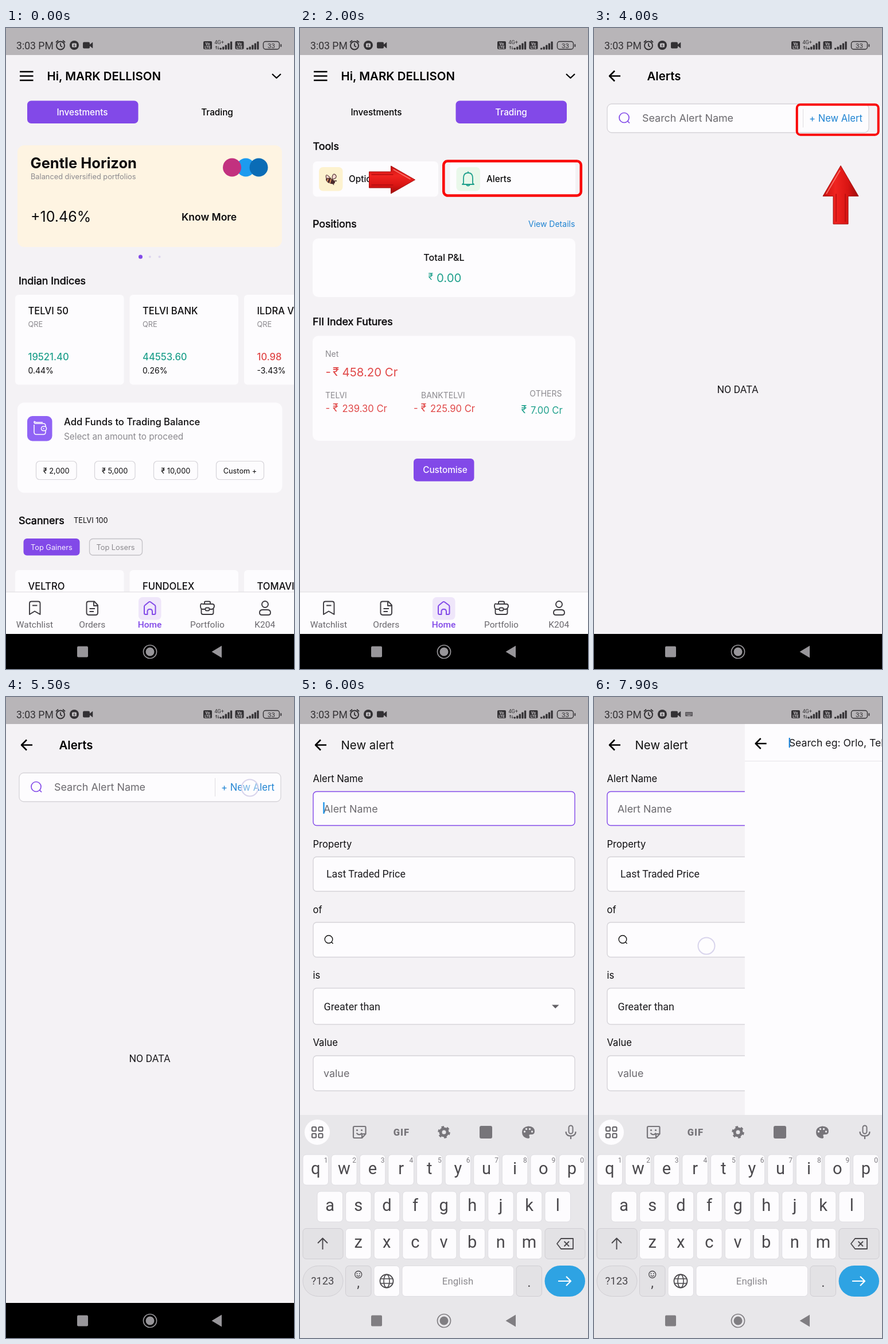
Recreate the animation shown at these times as an HTML page. Size 502 by 1115 pixels, loop 8 s.

```html
<!DOCTYPE html>
<html lang="en">
<head>
<meta charset="utf-8">
<title>Creating a price alert</title>
<style>
html, body { margin: 0; width: 100%; height: 100%; overflow: hidden; background: #f4f2f5; }
#stage { display: block; width: 100vw; height: 100vh; font-family: Inter, sans-serif; font-optical-sizing: none; }
#stage text { white-space: pre; }
.rob { font-family: Roboto, sans-serif; }
</style>
</head>
<body>
<svg id="stage" viewBox="0 0 502 1115">
  <defs>
    <linearGradient id="red" x1="0" y1="0" x2="0" y2="1">
      <stop offset="0" stop-color="#c4100f"/><stop offset=".35" stop-color="#f02420"/>
      <stop offset=".7" stop-color="#d91513"/><stop offset="1" stop-color="#9c0c0c"/>
    </linearGradient>
  </defs>
</svg>
<script>
const W = 502, LOOP = 8000;
const PURPLE = '#8249e8', INK = '#0c0b0d', GREY = '#8b898e', GREEN = '#1fa08c', LOSS = '#e04747';
const BG = '#f4f2f5', CARD = '#fdfcfe', BLUE = '#1e83d2', HINT = '#6b696e', LINE = '#d6d4d9';

// Drawing helpers
const T = (x, y, s, size, fill = INK, more = '') =>
  `<text x="${x}" y="${y}" font-size="${size}" fill="${fill}" ${more}>${s}</text>`;
const R = (x, y, w, h, r, fill, stroke = 'none', sw = 1, more = '') =>
  `<rect x="${x}" y="${y}" width="${w}" height="${h}" rx="${r}" fill="${fill}" stroke="${stroke}" stroke-width="${sw}" ${more}/>`;
const C = (x, y, r, fill, stroke = 'none', sw = 1, more = '') =>
  `<circle cx="${x}" cy="${y}" r="${r}" fill="${fill}" stroke="${stroke}" stroke-width="${sw}" ${more}/>`;
const P = (d, stroke, sw = 2, fill = 'none', more = '') =>
  `<path d="${d}" stroke="${stroke}" stroke-width="${sw}" fill="${fill}" stroke-linejoin="round" ${more}/>`;
const G = (x, y, s) => `<g transform="translate(${x} ${y})">${s}</g>`;
const page = (id, body, h = 1054, bg = BG) =>
  `<svg id="${id}" width="${W}" height="${h}">${bg ? R(0, 0, W, h, 0, bg) : ''}${body}</svg>`;
const MID = 'text-anchor="middle"', MED = 'font-weight="500"', SEMI = 'font-weight="600"', ROB = 'class="rob"';
const head = (x, y, s) => T(x, y, s, 17.9, INK, `stroke="${INK}" stroke-width=".55"`);
const back = (x, y) => G(x, y, P('M20 0H1M10 -9L1 0L10 9', '#000', 2.5));
const lens = (x, y, r, color, sw) => C(x, y, r, 'none', color, sw) +
  P(`M${x + r * .7} ${y + r * .7}l${r * .42} ${r * .42}`, color, sw);

function statusBar() {
  const ink = '#333134';
  const volte = x => R(x, 23, 15, 14, 2, ink) +
    T(x + 7.5, 29.5, 'Vo', 6.5, '#c8c5c8', `${MID} ${ROB} font-weight="700"`) +
    T(x + 7.5, 36, 'LTE', 6.5, '#c8c5c8', `${MID} ${ROB} font-weight="700"`);
  const bars = x => [3, 5, 8, 11, 14].map((h, i) => R(x + i * 4.6, 37.5 - h, 3.3, h, .8, ink)).join('');
  return R(0, 0, W, 47, 0, '#b8b5b8') +
    T(18, 36.5, '3:03 PM', 17.6, ink, ROB) +
    C(95, 30.5, 7, 'none', ink, 2) + P('M95 26.5V31L98 33M87 25L91 21.5M103 25L99 21.5', ink, 1.8) +
    C(119, 30, 8, ink) + R(115, 26.5, 8, 7, 1.5, '#c0bdc0') + P('M119 28v4M117.5 30.5L119 32L120.5 30.5', ink, 1) +
    R(134, 24.5, 12, 11, 2, ink) + P('M146 29L151 25V35L146 31Z', ink, .5, ink) +
    volte(344) + T(363.5, 28, '4G+', 9, ink, ROB) +
    P('M366.5 37V32M365 33.5L366.5 31.5L368 33.5M370 32V37M368.7 35.5L370 37L371.3 35.5', ink, .9) +
    bars(372.5) + volte(399.5) + bars(419) +
    R(448.5, 23.5, 28, 13.5, 4, 'none', ink, 1.4) + R(478.5, 28, 1.8, 5, .9, ink) +
    T(462.5, 34.5, '33', 11.5, ink, `${MID} ${ROB}`) +
    `<g id="kbIcon">${R(159, 26, 13, 7.5, 1, '#5b585c')}${P('M160.5 28.3H171M160.5 30.3H171', '#b8b5b8', .9, 'none', 'stroke-dasharray="1.2 .8"')}${P('M163 32.2H168', '#b8b5b8', .9)}</g>`;
}

function tile(x, y, name, value, pct, color, id = '') {
  return R(x, y, 189.5, 156.5, 6, CARD) + T(x + 22.5, y + 34, name, 16.6, INK, MED) +
    T(x + 22.5, y + 56, 'QRE', 12.8, GREY) +
    T(x + 22.5, y + 114, value, 16.6, color, `${MED} ${id && `id="${id}Val"`}`) +
    T(x + 22.5, y + 137, pct, 14, INK, id && `id="${id}Pct"`);
}

function investments() {
  const chip = (x, w, s) => R(x, 753.5, w, 32, 6, CARD, LINE, 1.2) + T(x + w / 2, 775, s, 12.8, INK, MID);
  return R(20, 204, 461, 177, 12, '#fef4e2') +
    T(42.5, 244, 'Gentle Horizon', 25.5, INK, 'font-weight="700"') +
    T(43, 263, 'Balanced diversified portfolios', 12.8, GREY) +
    C(418, 242.5, 16, '#1d9bef') + C(440.5, 242.5, 16, '#0a6cb6') + C(394, 242.5, 16, '#c2317f') +
    T(43, 336.5, '+10.46%', 25) + T(306, 335, 'Know More', 17.5, INK, SEMI) +
    C(234.5, 398, 3.5, PURPLE) + C(250.8, 398, 2, '#dcd5ee') + C(267.5, 398, 2, '#dcd5ee') +
    head(22, 446, 'Indian Indices') +
    tile(16, 464, 'TELVI 50', '19521.40', '0.44%', GREEN) +
    tile(215.5, 464, 'TELVI BANK', '44553.60', '0.26%', GREEN, 'tick') +
    tile(415, 464, 'ILDRA VIN', '10.98', '-3.43%', LOSS) +
    R(20, 651.5, 461.5, 157, 12, CARD) + R(37, 675, 43.5, 43.5, 9, '#9063f5') +
    P('M49 690V703Q49 707 53 707H65Q69 707 69 703V692Q69 688 65 688H52Q49 688 49 685.5T52 686H64', '#fff', 1.5) +
    R(61.5, 693, 9, 7.5, 3.5, '#9063f5', '#fff', 1.5) + C(65.5, 696.8, 1, '#fff') +
    T(101, 691, 'Add Funds to Trading Balance', 16.6, INK, MED) + T(101, 716, 'Select an amount to proceed', 15.3, GREY) +
    chip(52.5, 70.5, '₹ 2,000') + chip(154.5, 70.5, '₹ 5,000') + chip(257.5, 76.5, '₹ 10,000') + chip(366.5, 83, 'Custom +') +
    head(22, 863, 'Scanners') + T(118, 861, 'TELVI 100', 12.8) +
    R(30.5, 888, 98, 29.5, 6, PURPLE) + T(43, 907.5, 'Top Gainers', 12.8, '#f6f0ff') +
    R(145.5, 888.5, 92, 28.5, 6, 'none', '#c3c1c6', 1.3) + T(157.5, 907.5, 'Top Losers', 12.8, GREY) +
    ['VELTRO', 'FUNDOLEX', 'TOMAVI'].map((s, i) => tile(16 + 199.5 * i, 943, s, '', '', INK)).join('');
}

function trading() {
  const bee = P('M53 261Q43 250 46 262Q48 266 53 264ZM56 260Q58 250 63 257Q64 262 57 263Z', '#5a3a3a', 1.2, '#f7d9d2') +
    `<ellipse cx="53" cy="266" rx="8.5" ry="4.5" transform="rotate(24 53 266)" fill="#4a2a2c"/>` +
    P('M49 262L47.5 267M54 263L52 270', '#e79a63', 1.8) + P('M60 266L64 266M57 270L59 273', '#3b2325', 1.3);
  const bell = P('M285 270V261Q285 252 293 252T301 261V270L303 272H283ZM290 273Q293 276 296 273M293 252V249.5', GREEN, 1.8);
  const money = (x, y, s, size, color, sign = true, rs = size) =>
    (sign ? T(x - 29, y - 1, '-', size, color) : '') + T(x - 16.5, y - 1, '₹', rs, color) + T(x, y, s, size, color);
  return head(22.5, 212, 'Tools') +
    R(22.5, 232, 218.5, 61.5, 7, CARD) + R(33, 242, 41.5, 41.5, 7, '#fdf2cf') + bee + T(85, 268, 'Option Chain', 15.3, INK, MED) +
    R(261.5, 232, 218.5, 61.5, 7, CARD) + R(272.5, 242, 41.5, 41.5, 7, '#e9f8ea') + bell + T(325, 268, 'Alerts', 15.3, INK, MED) +
    head(22, 347, 'Positions') + T(398, 346, 'View Details', 14, BLUE) +
    R(22, 366, 458, 102, 10, CARD) + T(251, 405, 'Total P&amp;L', 16.1, INK, `${MID} ${MED}`) +
    T(223.5, 438, '₹', 16, GREEN) + T(238, 441.5, '0.00', 20.4, GREEN) +
    head(22, 517, 'FII Index Futures') + R(22, 535.5, 458, 182.5, 10, CARD) +
    T(44, 572, 'Net', 14, GREY) + money(73.5, 606, '458.20 Cr', 20.4, LOSS) +
    T(44, 644, 'TELVI', 14, GREY) + money(73.5, 668, '239.30 Cr', 16.6, LOSS, true, 18) +
    T(211, 644, 'BANKTELVI', 14, GREY) + money(227, 668, '225.90 Cr', 16.6, LOSS, true, 18) +
    T(456.5, 641, 'OTHERS', 14, GREY, 'text-anchor="end"') + money(402, 671, '7.00 Cr', 16.6, GREEN, false, 18) +
    R(198, 749, 105.5, 39.5, 6, PURPLE) + T(253, 774, 'Customise', 15.3, '#fbf8ff', `${MID} ${MED}`);
}

function bottomNav() {
  const ink = '#3d3b40', lab = '#69676c';
  const names = ['Watchlist', 'Orders', 'Home', 'Portfolio', 'K204'];
  return R(0, 981, W, 73, 0, CARD) + P('M0 981H502', '#dddbe0', 1.2) + R(231, 990, 39.5, 39.5, 7, '#efe6fa') +
    P('M41 1020V1001Q41 997.5 44.5 997.5H56Q59.5 997.5 59.5 1001V1020L50 1014.5ZM46 1004.5H54.5', ink, 1.9) +
    P('M144 997.5H154L160 1004V1017Q160 1021 156 1021H145Q140.5 1021 140.5 1017V1001Q140.5 997.5 144 997.5M153 998V1005H160M145.5 1010H155M145.5 1015H153', ink, 1.9) +
    P('M241 1018V1006.5Q241 1005 242.3 1004L249 998.5Q250.5 997.5 252 998.5L259.5 1004Q260.5 1005 260.5 1006.5V1018Q260.5 1020 258.5 1020H255V1015Q255 1011 250.7 1011T246.5 1015V1020H243Q241 1020 241 1018', PURPLE, 2) +
    P('M342.5 1002H359.5Q363 1002 363 1005.5T359.5 1011H354.5M347.5 1011H342.5Q339 1011 339 1005.5T342.5 1002M346 1002V999Q346 997.5 348 997.5H354Q356 997.5 356 999V1002M340.5 1010V1017Q340.5 1020 343.5 1020H358.5Q361.5 1020 361.5 1017V1010', ink, 1.9) +
    R(347.5, 1008.5, 7, 5, 2, CARD, ink, 1.8) +
    C(451.5, 1002.5, 5.5, 'none', ink, 1.9) +
    P('M442 1017Q442 1012 447.5 1012H455.5Q461 1012 461 1017Q461 1021 457 1021H446Q442 1021 442 1017', ink, 1.9) +
    names.map((s, i) => T(50 + 100.3 * i, 1043, s, 15.5, i === 2 ? PURPLE : lab, `${MID} ${ROB} ${i === 2 ? MED : ''}`)).join('');
}

const home = () => page('home',
  P('M24 76H47.5M24 83.5H47.5M24 91H47.5', '#000', 2.4) +
  T(71.5, 91, 'Hi, MARK DELLISON', 20.4, '#000', SEMI) + P('M464 80L471.5 87L479 80', '#000', 2.3) +
  R(37, 126.5, 193.5, 39.5, 7, PURPLE, 'none', 0, 'id="pill"') +
  T(133, 152, 'Investments', 15.3, INK, `${MID} ${MED} id="tabA"`) +
  T(368, 152, 'Trading', 15.3, INK, `${MID} ${MED} id="tabB"`) +
  page('inv', investments(), 981, '') + page('trd', trading(), 981, '') + bottomNav());

const alerts = () => page('alerts', back(26, 83.5) + T(92.5, 91, 'Alerts', 20.4, '#000', SEMI) +
  R(23, 132, 456, 50, 8, CARD, LINE, 1.3) + lens(52.5, 156, 8.5, PURPLE, 1.7) +
  T(84, 163, 'Search Alert Name', 17.9, HINT) + P('M364.5 141V173', '#dedce1', 1) +
  T(375, 163, '+ New Alert', 16.6, BLUE) + T(250.5, 635, 'NO DATA', 17.6, '#1c1b1e', `${MID} ${ROB}`));

function newAlert() {
  const box = (y, h, line = LINE) => R(23, y, 456, h, 6, CARD, line, 1.4);
  const label = (y, s) => T(22.5, y, s, 16.6);
  return page('create', back(26, 83.5) + T(71.5, 91, 'New alert', 20.4, '#111') +
    label(148, 'Alert Name') + box(164.5, 59, PURPLE) + T(41, 200.5, 'Alert Name', 17.9, HINT) +
    R(40.3, 183, 2.4, 20, 0, '#1f95e8', 'none', 0, 'id="caret"') +
    label(261.5, 'Property') + box(278, 60) + T(46, 314, 'Last Traded Price', 17.8, '#1c1b1e', ROB) +
    label(375.5, 'of') + box(392, 60.5) + lens(50, 421.5, 6.8, '#111', 1.4) +
    label(490, 'is') + box(506.5, 63) + T(41.5, 544.5, 'Greater than', 17.9, '#1c1b1e', ROB) +
    P('M439 535.5H451.5L445.2 541.8Z', 'none', 0, '#626065') +
    label(607, 'Value') + box(624, 61) + T(41, 660.5, 'value', 17.9, HINT));
}

const search = () => page('search', back(18, 81) + T(77, 86, 'Search eg: Orlo, Tel 50', 17.7, '#1a191c') +
  R(77, 71, 2.2, 17, 0, '#1f83d8') + P('M0 111.5H502', '#e6e4e9', 1), 728, '#fdfcfe');

function keyboard() {
  const ink = '#4a484c', ic = '#77757a', edge = '#d0ced3', soft = '#e3e2e5';
  const key = (x, y, s, n = '') => R(x, y, 44.5, 53, 6, '#fdfcfe', '#dad8dd', .8) +
    T(x + 22.2, y + 33.5, s, 29, ink, `${MID} ${ROB}`) + (n !== '' ? T(x + 40, y + 13.5, n, 12, '#7d7b80', `${MID} ${ROB}`) : '');
  const row = (s, x, y, nums) => [...s].map((c, i) => key(x + i * 49.62, y, c, nums ? (i + 1) % 10 : '')).join('');
  const grid = [0, 1, 2, 3].map(i => R(21 + (i % 2) * 11.5, 748 + (i >> 1) * 11.5, 7, 7, 1.5, 'none', '#5f5d62', 2)).join('');
  const gear = C(251, 757, 6, 'none', ic, 5) + C(251, 757, 9, 'none', ic, 3.5, 'stroke-dasharray="4.5 4.925"');
  const palette = P('M398 746.5Q409 747 409 755.5Q409 761 403 761H400.5Q398.5 762 400 764.5Q401 768 397 767.8Q387 766 387 757T398 746.5Z', ic, 0, ic) +
    [[391.5, 756], [394.5, 751.5], [400.5, 751.5], [404.5, 756]].map(p => C(...p, 1.7, '#e8e7ea')).join('');
  return R(0, 727, W, 400, 0, '#e8e7ea') + C(30, 757, 22, '#fdfcfe') + grid +
    P('M95 747H113Q114.5 747 114.5 749V760L108 767H95Q93 767 93 765V749Q93 747 95 747M108 767V760H114.5M98.5 758.5Q103.5 764 108 758.5', ic, 2.2) +
    C(99.5, 753.5, 1.6, ic) + C(107.5, 753.5, 1.6, ic) +
    T(177, 763, 'GIF', 16.5, ic, `${MID} ${ROB} font-weight="900" letter-spacing="1"`) + gear +
    R(313, 746, 22, 22, 3, ic) + palette +
    R(468.5, 745.5, 7, 14, 3.5, 'none', ic, 2) + P('M463.5 756Q463.5 763.5 472 763.5T480.5 756M472 764V769', ic, 2.2) +
    row('qwertyuiop', 5, 796, true) + row('asdfghjkl', 30, 860) + row('zxcvbnm', 79.5, 924.5) +
    R(5, 924.5, 70, 53, 6, soft, edge) + P('M39.5 961V942M31 950L39.5 941.5L48 950', ink, 1.9) +
    R(427, 924.5, 70, 53, 6, soft, edge) +
    P('M455 942H476V960H455L448 951ZM460.5 947L469 955.5M469 947L460.5 955.5', ink, 1.8) +
    R(5, 989.5, 70, 53, 26.5, soft, edge) + T(39.5, 1022, '?123', 18.5, ink, `${MID} ${ROB}`) +
    R(79.5, 989.5, 44.5, 53, 6, soft, edge) + C(101.7, 1004.5, 6, 'none', ink, 1.3) +
    C(99.5, 1003, .9, ink) + C(104, 1003, .9, ink) + P('M98.7 1006Q101.7 1009 104.7 1006', ink, 1.2) +
    T(101.7, 1027, ',', 24, ink, `${MID} ${ROB}`) +
    R(129, 989.5, 44.5, 53, 6, '#fdfcfe', '#dad8dd', .8) + C(151, 1016, 11.5, 'none', ink, 1.8) +
    `<ellipse cx="151" cy="1016" rx="5" ry="11.5" fill="none" stroke="${ink}" stroke-width="1.6"/>` +
    P('M140.5 1012H161.5M140.5 1020H161.5', ink, 1.6) +
    R(178, 989.5, 194.5, 53, 6, '#fdfcfe', '#dad8dd', .8) + T(275, 1022, 'English', 16.8, GREY, `${MID} ${ROB}`) +
    R(377, 989.5, 44.5, 53, 6, soft, edge) + T(399.5, 1026, '.', 24, ink, `${MID} ${ROB}`) +
    R(426.5, 989, 70.5, 54, 27, '#2ea3e3') + P('M450 1016H472M464 1008L472 1016L464 1024', '#fff', 2.2);
}

const sysNav = () => `<g id="sysNav">${R(124, 1075.5, 19, 19, 2, 'currentColor') + C(251, 1085, 11.5, 'none', 'currentColor', 1.7) +
  C(251, 1085, 7.5, 'currentColor') + P('M376 1074.5V1095.5L358.5 1085Z', 'none', 0, 'currentColor')}</g>`;

// Right-pointing glossy arrow of length l, head width h, head length n, shaft width s, tip at the origin
function arrow(l, h, n, s) {
  const d = `M${-l} ${-s / 2}H${-n}V${-h / 2}L0 0L${-n} ${h / 2}V${s / 2}H${-l}Z`;
  return P(d, '#a51212', 1, 'url(#red)') +
    P(`M${-n + 4} ${-h / 2 + 6}L-8 -1`, '#ff8a80', 1.6, 'none', 'opacity=".8"') +
    P(`M${-l + 4} ${-s / 2 + 5}H${-n + 4}M${-l + 4} ${s / 2 - 5}H${-n + 4}`, '#b30e0e', 1.4);
}
const frame = (x, y, w, h, sw, r) => R(x, y, w, h, r, 'none', '#fa0505', sw);

const stage = document.getElementById('stage');
stage.insertAdjacentHTML('beforeend',
  R(0, 0, W, 1115, 0, BG) + home() + alerts() + newAlert() + search() +
  R(0, 1054, W, 61, 0, '#000') + `<g id="kb">${keyboard()}</g>` + sysNav() + statusBar() +
  `<g id="markA">${frame(250.3, 231.5, 239.5, 60, 4.6, 7)}${G(200.5, 264, arrow(80, 48, 42, 28))}</g>
   <g id="markB">${frame(353.7, 133.2, 142, 52.5, 4, 6)}<g transform="translate(430 239.5) rotate(-90)">${arrow(101.5, 62, 53, 26)}</g></g>
   <g id="markC">${frame(11.5, 356.5, 484, 123, 9, 10)}</g>` +
  C(0, 0, 14.5, '#ffffff66', '#d8d4ec', 2, 'id="touch"'));

const el = {};
stage.querySelectorAll('[id]').forEach(e => el[e.id] = e);

const clamp = v => Math.max(0, Math.min(1, v));
const part = (t, start, dur) => clamp((t - start) / dur);
const easeOut = p => 1 - (1 - p) ** 2;
const show = (id, on) => el[id].style.display = on ? '' : 'none';

// cubic-bezier(.25, .1, .25, 1)
function ease(x) {
  let a = 0, b = 1, u = .5;
  const bez = (p, q) => 3 * u * (1 - u) ** 2 * p + 3 * u * u * (1 - u) * q + u ** 3;
  for (let i = 0; i < 24; i++) {
    u = (a + b) / 2;
    if (bez(.25, .25) < x) a = u; else b = u;
  }
  return bez(.1, 1);
}

// Start, end, x, y
const taps = [[940, 1260, 390, 155], [2900, 3120, 380, 263], [5410, 5620, 425, 158], [7700, 7960, 196, 433]];

function slide(id, t, start) {
  const p = easeOut(part(t, start, 300));
  show(id, p > 0);
  el[id].setAttribute('x', W * (1 - p));
}

function draw(t) {
  const p = ease(part(t, 1117, 300));
  const grey = v => `rgb(${[v, v, v].map(n => Math.round(n * 255))})`;
  el.inv.setAttribute('x', -W * p);
  el.trd.setAttribute('x', W * (1 - p));
  el.pill.setAttribute('x', 37 + 234.5 * p);
  el.tabA.setAttribute('fill', grey(1 - p));
  el.tabB.setAttribute('fill', grey(p));
  el.tickVal.textContent = t < 500 ? '44553.60' : '44554.55';
  el.tickPct.textContent = t < 500 ? '0.26%' : '0.27%';

  slide('alerts', t, 3020);
  slide('create', t, 5525);
  slide('search', t, 7818);
  show('caret', t < 7700 && (t - 5600) % 1000 < 500);

  const k = easeOut(part(t, 5677, 285));
  show('kb', k > 0);
  el.kb.setAttribute('transform', `translate(0 ${388 * (1 - k)})`);
  el.sysNav.setAttribute('color', k > .15 ? '#807e82' : '#98969a');
  show('kbIcon', t >= 6200);

  show('markA', t >= 1900 && t < 2800);
  show('markB', t >= 3400 && t < 5400);
  show('markC', t >= 6400 && t < 7500);

  const tap = taps.find(([a, b]) => t >= a && t < b);
  show('touch', tap);
  if (tap) {
    el.touch.setAttribute('cx', tap[2]);
    el.touch.setAttribute('cy', tap[3]);
  }
}

const began = performance.now();
function tick() {
  draw((performance.now() - began) % LOOP);
  requestAnimationFrame(tick);
}
tick();
</script>
</body>
</html>
```
